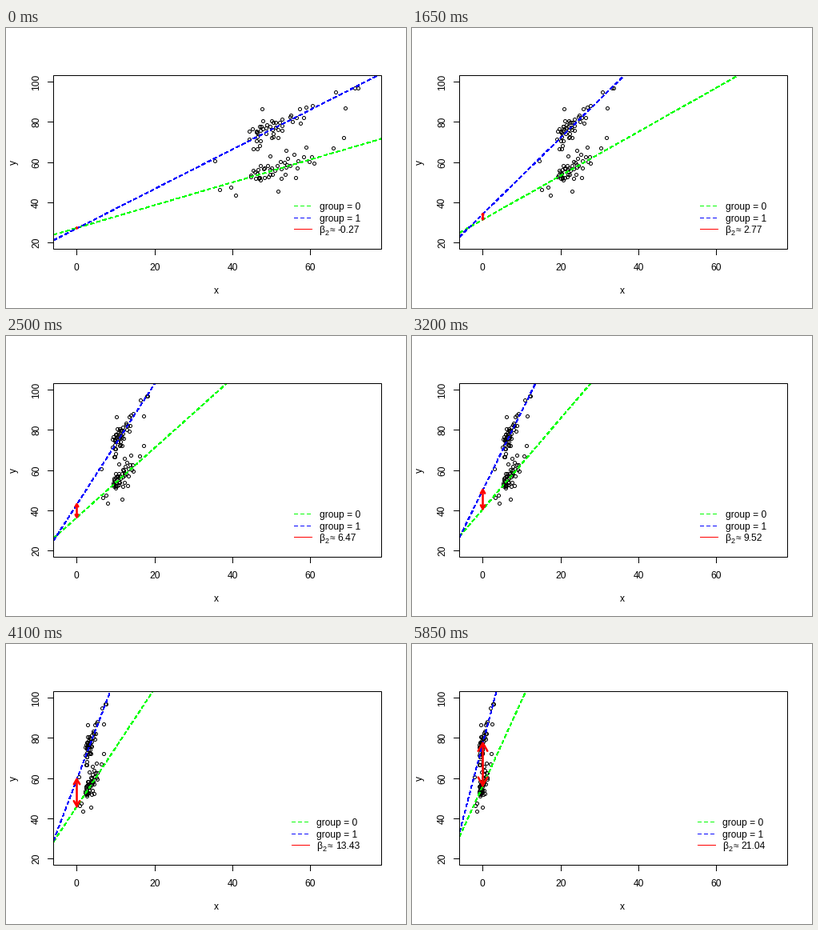
Write a matplotlib script that moves like this. It is 500x350 px and loops after 6.85 s.

```python
import numpy as np
import matplotlib.pyplot as plt
from matplotlib.animation import FuncAnimation
from matplotlib.patches import Rectangle

PT = 0.72                                   # points per pixel at 100 dpi
LEFT, RIGHT, TOP, BOTTOM = 59, 469, 59, 276
X0, X_UNIT = 88, 4.875
Y20, Y_UNIT = 268, 2.5125

STEPS, HOLD = 98, 19
MEAN, SD = 51, 7.5
INTERCEPT, SLOPE = 27.4, 0.568              # group 0 before scaling
BETA_START, BETA_STEP = -0.2705, 0.217475
SLOPE_GAP = BETA_STEP * STEPS / MEAN

plt.rcParams["font.family"] = "Liberation Sans"


def px(x):
    return X0 + x * X_UNIT


def py(y):
    return Y20 - (y - 20) * Y_UNIT


# Sample: two noisy regression groups plus the points at the rim
rng = np.random.default_rng(11)


def group(count, low, mode, high, intercept, slope, noise):
    x = rng.triangular(low, mode, high, count)
    return np.column_stack([x, intercept + slope * x
                            + rng.normal(0, noise, count)])


rim = [(72.2, 97), (71.4, 97), (66.5, 95), (69, 87), (68.5, 72), (35.5, 60.5),
       (47.6, 86.5), (51.7, 45.5), (40.8, 43.5), (36.7, 46.3), (39.6, 47.5)]
points = np.vstack([
    rim,
    group(44, 42.5, 47.5, 63, INTERCEPT + BETA_START, SLOPE + SLOPE_GAP, 3.4),
    group(45, 42.5, 48, 66.5, INTERCEPT, SLOPE, 3.6),
])

fig = plt.figure(figsize=(5, 3.5), dpi=100, facecolor="white")
ax = fig.add_axes([0, 0, 1, 1])
ax.set_xlim(0, 500)
ax.set_ylim(350, 0)
ax.axis("off")


def line(xs=(), ys=(), color="black", width=1, **style):
    return ax.plot(xs, ys, color=color, lw=width * PT, **style)[0]


def dashed(color, **style):
    return line(color=color, linestyle=(0, (5, 3)), dash_capstyle="butt",
                antialiased=False, **style)


def text(x, y, label, size=12, **style):
    return ax.text(x, y, label, fontsize=size * PT, **style)


# Axes
ax.add_patch(Rectangle((LEFT, TOP), RIGHT - LEFT, BOTTOM - TOP, fill=False,
                       lw=PT, ec="black", snap=True, zorder=5))
for value in range(0, 61, 20):
    x = round(px(value))
    line([x, x], [BOTTOM, BOTTOM + 7])
    text(x, 303, str(value), ha="center")
for value in range(20, 101, 20):
    y = round(py(value))
    line([LEFT - 7, LEFT], [y, y])
    text(38, y + 0.5, str(value), rotation=90, ha="center", va="center")
text(263, 332, "x", ha="center")
text(9.5, 168, "y", rotation=90, ha="center", va="center")

# Moving parts
dots = line(linestyle="none", marker="o", markersize=4 * PT,
            markerfacecolor="none", markeredgecolor="black",
            markeredgewidth=PT, zorder=2)
fit0 = dashed("#00ff00", zorder=3)
fit1 = dashed("#0000ff", zorder=3)
shaft, head_high, head_low = [
    line(color="red", width=2.6, solid_capstyle="round",
         solid_joinstyle="round", zorder=4) for _ in range(3)]

# Legend: each part keeps its own x so that the block can shift
key_lines = [dashed("#00ff00"), dashed("#0000ff"), line(color="red")]
key_rows = [222, 237, 251]
beta_text = text(0, 256, "")
key_texts = [
    (391.5, text(0, 227, "group = 0")),
    (391.5, text(0, 242, "group = 1")),
    (391.5, text(0, 256, "β")),
    (398.5, text(0, 259, "2", size=9)),
    (405, text(0, 256, "≈")),
    (414.8, beta_text),
]


def set_fit(artist, intercept, slope):
    x_start = (LEFT - X0) / X_UNIT
    x_top = (20 + (Y20 - TOP) / Y_UNIT - intercept) / slope
    x_end = min((RIGHT - X0) / X_UNIT, x_top)
    xs = np.array([x_start, x_end])
    artist.set_data(px(xs) + 0.5, py(intercept + slope * xs) + 0.5)


def set_arrow(y_low, y_high, beta):
    dx, dy = 0.275 * abs(beta), 0.476 * beta
    shaft.set_data([X0, X0], [y_low, y_high])
    for head, tip, drop in ((head_high, y_high, dy), (head_low, y_low, -dy)):
        head.set_data([X0 + 0.5 - dx, X0 + 0.5, X0 + 0.5 + dx],
                      [tip + drop, tip, tip + drop])


def update(frame):
    step = min(max(frame - HOLD, 0), STEPS)
    t = step / STEPS
    shift, scale = t * MEAN, 1 + t * (SD - 1)
    beta = BETA_START + BETA_STEP * step

    dots.set_data(px((points[:, 0] - shift) / scale), py(points[:, 1]))

    base = INTERCEPT + SLOPE * shift
    set_fit(fit0, base, SLOPE * scale)
    set_fit(fit1, base + beta, (SLOPE + SLOPE_GAP) * scale)
    set_arrow(py(base), py(base + beta), beta)

    # The block is right-aligned, so a wider value pushes it left
    label = f"{round(beta, 2):g}"
    beta_text.set_text(label)
    offset = -3 if beta > 0 and len(label) > 4 else 0
    for artist, y in zip(key_lines, key_rows):
        artist.set_data([360 + offset, 382 + offset], [y, y])
    for x, artist in key_texts:
        artist.set_x(x + offset)
    return []


anim = FuncAnimation(fig, update, frames=137, interval=50, repeat=True,
                     repeat_delay=0, blit=False)
plt.show()
```
